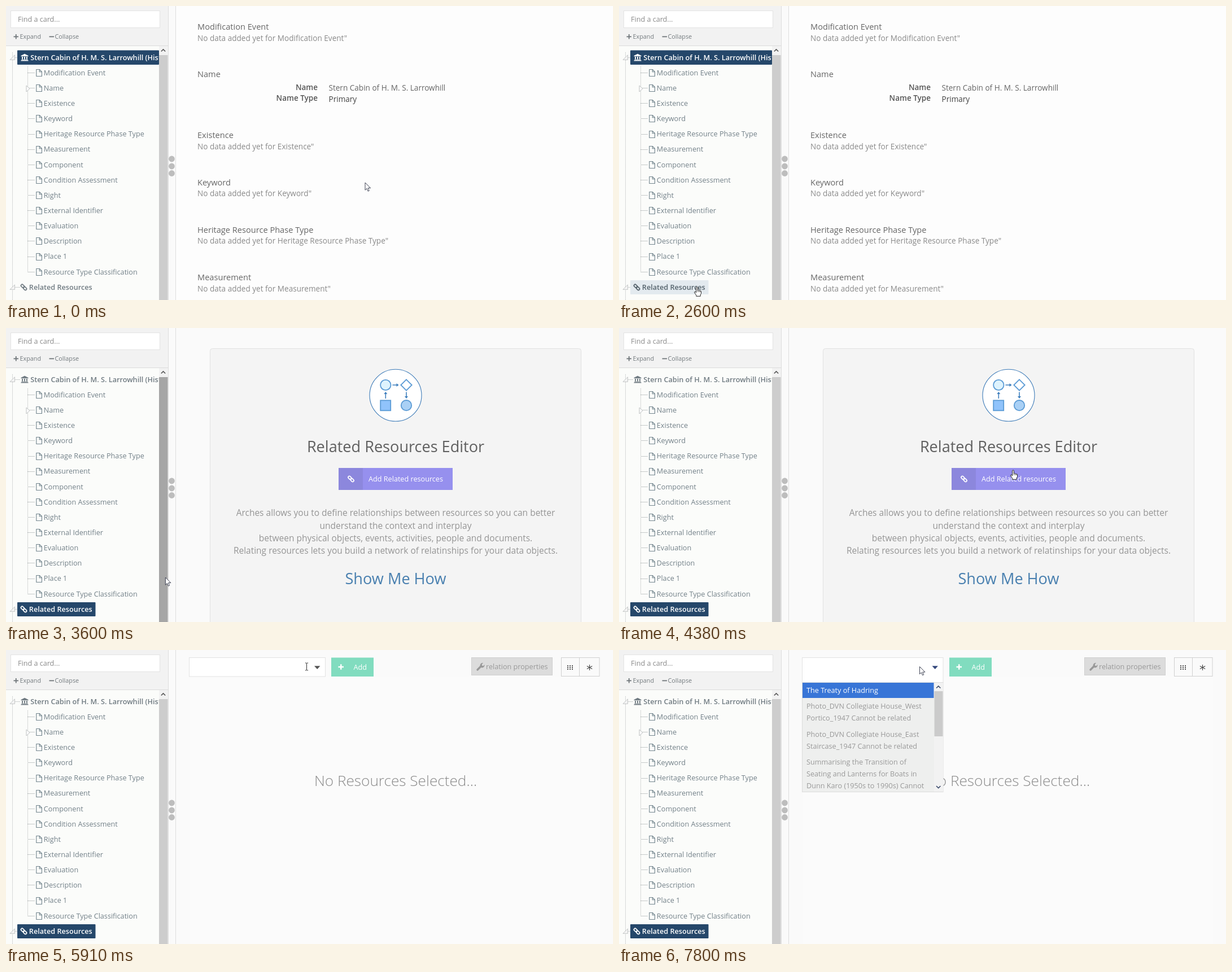
An HTML page for the animation above (8000 ms loop, 1075 by 521 pixels).

```html
<!DOCTYPE html>
<html lang="en">
<head>
<meta charset="utf-8">
<title>Resource editor</title>
<style>
html, body { margin: 0; width: 100%; height: 100%; overflow: hidden; background: #fdfdfd; }
svg { display: block; width: 100vw; height: 100vh; }
text { font-family: "Open Sans", "Noto Sans", sans-serif; white-space: pre; }
</style>
</head>
<body>
<svg id="stage" viewBox="0 0 1075 521" preserveAspectRatio="none"></svg>
<script>
const LOOP = 8000;
const SHIP = 'Stern Cabin of H. M. S. Larrowhill';
const CARDS = ['Modification Event', 'Name', 'Existence', 'Keyword', 'Heritage Resource Phase Type',
  'Measurement', 'Component', 'Condition Assessment', 'Right', 'External Identifier', 'Evaluation',
  'Description', 'Place 1', 'Resource Type Classification'];
const rowY = i => 91.3 + 27.14 * i;
const crisp = y => Math.floor(y) + 0.5;

// drawing helpers, all returning markup
const rect = (x, y, w, h, fill, more = '') => `<rect x="${x}" y="${y}" width="${w}" height="${h}" fill="${fill}" ${more}/>`;
const path = (d, fill, more = '') => `<path d="${d}" fill="${fill}" ${more}/>`;
const line = (d, color, w = 1, more = '') => path(d, 'none', `stroke="${color}" stroke-width="${w}" ${more}`);
const circle = (x, y, r, fill, more = '') => `<circle cx="${x}" cy="${y}" r="${r}" fill="${fill}" ${more}/>`;
const text = (x, y, size, fill, str, more = '') => `<text x="${x}" y="${Math.round(y)}" font-size="${size}" fill="${fill}" ${more}>${str}</text>`;
const group = (id, body, more = '') => `<g id="${id}" ${more}>${body}</g>`;
const mid = 'text-anchor="middle"', semi = 'font-weight="600"';

const chain = (x, y) => `<g transform="translate(${x} ${y}) rotate(45)" fill="none" stroke="currentColor" stroke-width="1.7">
  <rect x="-6.2" y="-2.1" width="6.6" height="4.2" rx="2.1"/><rect x="-.4" y="-2.1" width="6.6" height="4.2" rx="2.1"/></g>`;
const bank = (x, y) => path(`M${x} ${y - 3.2}l6.5 -3.3l6.5 3.3v1.2h-13zM${x + 1.6} ${y - 1.2}h2v4.4h-2zM${x + 5.5} ${y - 1.2}h2v4.4h-2zM${x + 9.4} ${y - 1.2}h2v4.4h-2zM${x + .8} ${y + 3.6}h11.4v1h-11.4zM${x} ${y + 5}h13v1.3h-13z`, 'currentColor');
const page = (x, y) => line(`M${x} ${y - 6}h5.6l4 4v8h-9.6zM${x + 5.4} ${y - 6}v4.2h4.2`, '#74868f', 1.15);
const corner = y => path(`M15.5 ${y - 4.5}v8.5h-8.5z`, '#f4f4f4', 'stroke="#c3c6c6"');

function sidebar() {
  let s = rect(0, 0, 287, 70, '#f2f2f2') + rect(0, 70, 287, 451, '#fbfcfa') + rect(0, 70, 287, 1, '#dcdcdc')
    + rect(8.5, 8.5, 264, 30, '#fff', 'stroke="#e3e3e3"')
    + text(21, 28.4, 12.6, '#8b8b8b', 'Find a card...')
    + line('M13.5 54.3h8.5M17.75 50v8.5M76.5 54.3h8.5', '#6e7478', 1.8)
    + text(24.5, 58.4, 10.8, '#737a7e', 'Expand') + text(86.5, 58.4, 10.8, '#737a7e', 'Collapse');
  s += line('M11.5 82v439M38.5 107v364', '#b4b8b8', 1, 'stroke-dasharray="1 1"');
  s += line(`M16 ${crisp(rowY(0))}h9M16 ${crisp(rowY(15))}h9`, '#cfd2d2') + corner(rowY(0)) + corner(rowY(15));
  s += rect(20, 78.5, 251, 25.5, '#25476a', 'rx="1" id="shipBox"')
    + group('ship', bank(26.5, rowY(0)) + text(43.3, rowY(0) + 4.3, 12.7, 'currentColor', SHIP + ' (Historic Resource)', semi), 'clip-path="url(#tree)"');
  CARDS.forEach((name, i) => {
    const y = rowY(i + 1);
    s += line(`M38 ${crisp(y)}h13`, '#c6caca') + rect(47, y - 13, 10, 26, '#e3eaef', `id="box${i}" display="none"`)
      + page(53.8, crisp(y)) + text(66.8, y + 4.3, 12.65, '#738189', name, `id="card${i}"`);
  });
  s += path('M36 141v11l6 -5.500z', '#fcfcfc', 'stroke="#bcc0c0"');
  s += rect(20, 486, 138.5, 25, '#25476a', 'rx="1" id="linkBox"')
    + group('link', chain(31.5, rowY(15)) + text(40.8, rowY(15) + 4.3, 12.65, 'currentColor', 'Related Resources', semi));
  s += rect(271, 71, 16, 450, '#f2f2f2') + rect(271, 87, 15.5, 434, '#cdcdcd', 'id="thumb"')
    + line('M274.800 80.500l3.700 -3.600l3.700 3.600', '#555', 1.6);
  s += rect(287, 0, 14, 521, '#fafafa') + line('M287.500 0v521M300.500 0v521', '#dedede');
  return s + [271, 284, 296.5].map(y => circle(293.5, y, 5.4, '#bdbdbd')).join('');
}

function report() {
  const heads = [[0, 42], [1, 126], [2, 234], [3, 317.6], [4, 401.6], [5, 486]];
  return rect(301, 0, 774, 521, '#fdfdfd') + heads.map(([i, y]) => text(339, y, 14.6, '#666', CARDS[i])
    + (i === 1 ? '' : text(339, y + 19.5, 13.57, '#8a8a8a', `No data added yet for ${CARDS[i]}"`))).join('')
    + text(552, 148.6, 13.5, '#555', 'Name', semi + ' text-anchor="end"')
    + text(552, 168.3, 13.5, '#555', 'Name Type', semi + ' text-anchor="end"')
    + text(571.5, 150, 13.57, '#666', SHIP) + text(571.5, 169.6, 13.57, '#444', 'Primary');
}

function editor() {
  const blue = '#5b9bd5', edge = `stroke="${blue}" stroke-width="1.8"`;
  const lines = ['Arches allows you to define relationships between resources so you can better',
    'understand the context and interplay', 'between physical objects, events, activities, people and documents.',
    'Relating resources lets you build a network of relatinships for your data objects.'];
  return rect(301, 0, 774, 521, '#fafafa') + rect(361.5, 36.5, 657, 500, '#f4f4f4', 'rx="4" stroke="#e1e1e1"')
    + circle(690, 119.3, 46, '#fff', 'stroke="#3d7bb8" stroke-width="1.1"')
    + circle(672.3, 101, 9.2, '#def3fd', edge) + path('M709 91.300l9.700 9.700l-9.700 9.700l-9.700 -9.700z', '#fff', edge)
    + rect(663.2, 128.3, 18, 18, '#90c3fb', edge) + circle(709, 137.2, 9.2, '#a9d0f5', edge)
    + line('M684.500 101h8M672.300 125v-8M709 113.500v8', '#3f7fbd', 1.6)
    + path('M691.500 98l4 3l-4 3zM669.300 117l3 -4l3 4zM706 121l3 4l3 -4z', '#3f7fbd')
    + text(690, 220, 27.1, '#606060', 'Related Resources Editor', mid)
    + rect(589, 248, 202, 39, '#9690ee') + rect(589, 248, 43, 39, '#8c87dd')
    + `<g color="#fff">${chain(611, 267.5)}</g>` + text(642, 272, 12.65, '#fff', 'Add Related resources')
    + lines.map((l, i) => text(690, 333.3 + 22.2 * i, 15.5, '#959595', l, mid)).join('')
    + text(690, 454, 27.1, '#487faf', 'Show Me How', mid);
}

function picker() {
  let dots = '';
  for (let i = 0; i < 9; i++) dots += rect(994 + 4 * (i % 3), 27 + 3 * Math.floor(i / 3), 2, 2, '#555');
  const add = rect(576, 13.5, 75, 33.5, '#81dcbf') + line('M588.500 30h9.500M593.250 25.300v9.500', '#fff', 2.4)
    + text(615.5, 34.8, 12.65, '#fff', 'Add');
  const items = [[104, 'Photo_DVN Collegiate House_West'], [125, 'Portico_1947 Cannot be related'],
    [153.6, 'Photo_DVN Collegiate House_East'], [174.6, 'Staircase_1947 Cannot be related'],
    [203, 'Summarising the Transition of'], [224.2, 'Seating and Lanterns for Boats in'],
    [245.4, 'Dunn Karo (1950s to 1990s) Cannot']];
  return rect(301, 0, 774, 521, '#fafafa') + rect(325, 47, 727, 474, '#fbfbfb')
    + text(690, 241, 26.2, '#8b8b8b', 'No Resources Selected...', mid + ' font-weight="300"')
    + group('add', add)
    + rect(824.5, 13.5, 143, 31, '#dcdcdc', 'stroke="#cfcfcf"')
    + line('M835 35l6.500 -6.500', '#999', 3.4, 'stroke-linecap="round"')
    + path('M840 29a4.300 4.300 0 0 1 5 -6l-2.300 2.500l.5 2.200l2.200 .5l2 -2.400a4.300 4.300 0 0 1 -5.800 5.200z', '#999')
    + text(850, 33.6, 12.65, '#999', 'relation properties')
    + rect(983.5, 13.5, 32, 33, '#fafafa', 'stroke="#d0d0d0"') + rect(1015.5, 13.5, 35.5, 33, '#fafafa', 'stroke="#d0d0d0"')
    + dots + line('M1033.500 26v10M1028.800 28.500l9.400 5M1038.200 28.500l-9.400 5', '#4a4a4a', 1.2)
    + group('shut', rect(324.5, 13.5, 241, 33.5, '#fff', 'stroke="#e2e2e2"') + path('M546 28.300h10.400l-5.200 5.700z', '#555'))
    + group('open', rect(324.5, 13.5, 249.5, 44, '#fff', 'stroke="#e2e2e2"') + path('M554.500 28.300h10.400l-5.200 5.700z', '#34487c')
      + rect(340, 23, 1, 15, '#333', 'id="caret"'))
    + group('wait', rect(324.5, 57, 249.5, 29.5, '#fff', 'stroke="#e2e2e2"') + text(332, 76, 12.65, '#888', 'Searching...'))
    + group('list', rect(324.5, 57.5, 249.5, 194, '#eeefee', 'stroke="#dcdcdc"') + rect(325, 58, 232.5, 27, '#3875d7')
      + text(332, 76, 12.65, '#fff', 'The Treaty of Hadring') + items.map(([y, l]) => text(332, y, 12.65, '#999', l)).join('')
      + rect(558, 58, 16, 193, '#f2f2f2') + rect(558.5, 73, 15, 80, '#cbcbcb')
      + line('M562 67.500l3.700 -3.600l3.700 3.600M562 241l3.700 3.600l3.700 -3.600', '#3a4a6b', 1.6));
}

const cursors = group('arrow', path('M0 0v13.200l3 -2.800l2 4.800l2.200 -.9l-2 -4.700h4.300z', '#fff', 'stroke="#2b2f42" stroke-width=".9"'))
  + group('hand', path('M-1.300 1.200Q0 -.7 1.300 1.200V6.300Q2.700 5.300 3.500 6.800Q5 6 5.700 7.400Q7.400 7 7.500 8.600V12L6.200 14.500V16.800H-1.200V15L-4.300 10.500Q-4.800 8.600 -3.200 8.700L-1.300 10.300z', '#fff', 'stroke="#222" stroke-width="1"')
    + line('M1.300 6.300v3M3.500 7v2.500M5.600 7.600v2', '#222', .7))
  + group('beam', line('M-2.600 -6.500h2l.6 .6l.6 -.6h2M-2.600 6.500h2l.6 -.6l.6 .6h2M0 -5.900v11.800', '#333', 1));

const stage = document.getElementById('stage');
stage.innerHTML = '<clipPath id="tree"><rect x="0" y="71" width="270.500" height="450"/></clipPath>'
  + group('report', report()) + group('editor', editor()) + group('picker', picker()) + sidebar() + cursors;

const el = id => document.getElementById(id);
const show = (id, on) => el(id).setAttribute('display', on ? 'inline' : 'none');
const ends = CARDS.map((_, i) => 72 + el('card' + i).getComputedTextLength());
ends.forEach((x, i) => el('box' + i).setAttribute('width', x - 47));

// pointer moves: first step, last step, number of steps, bezier x and y
const MOVES = [
  [500, 1270, 11, [636, 600, 280, 205.5], [313, 360, 230, 96.5]],
  [1360, 2130, 11, [205.5, 212, 225, 249], [96.5, 200, 400, 480]],
  [2210, 2600, 6, [249, 225, 170, 138], [480, 478, 498, 497.5]],
  [3300, 4080, 11, [138, 260, 540, 667], [497.5, 470, 300, 279]],
  [4130, 4380, 4, [667, 675, 697, 698], [279, 265, 245, 251.5]],
  [4460, 4510, 2, [698, 697, 692, 688], [251.5, 256, 262, 267]],
  [5280, 5910, 9, [688, 640, 535, 532.5], [267, 120, -30, 29.5]]
];
const bezier = ([a, b, c, d], u) => {
  const v = 1 - u;
  return v * v * v * a + 3 * v * v * u * b + 3 * v * u * u * c + u * u * u * d;
};
function pointer(t) {
  let pos = [636, 313];
  for (const [from, to, n, xs, ys] of MOVES) {
    if (t < from) break;
    const k = Math.min(n, 1 + Math.floor((t - from) / (to - from) * (n - 1) + 1e-6)) / n;
    const u = k * k * (3 - 2 * k);
    pos = [bezier(xs, u), bezier(ys, u)];
  }
  return pos;
}

function draw(t) {
  const [x, y] = pointer(t);
  const picked = t >= 2900, view = t < 2980 ? 'report' : t < 4740 ? 'editor' : 'picker';
  const opened = t >= 6180, listed = t >= 6560;
  const row = Math.floor((y - rowY(0) + 13.3) / 27.14);
  const onShip = row === 0 && x > 20 && x < 271;
  const onLink = row === 15 && x > 20 && x < 159;
  const onCard = row > 0 && row < 15 && x > 47 && x < ends[row - 1];
  const onButton = view === 'editor' && x > 589 && x < 791 && y > 248 && y < 287;
  const onField = view === 'picker' && !opened && x > 325 && x < 566 && y > 8 && y < 47;

  for (const v of ['report', 'editor', 'picker']) show(v, v === view);
  CARDS.forEach((_, i) => show('box' + i, onCard && row === i + 1));
  show('shipBox', !picked || onShip);
  el('ship').setAttribute('color', picked ? '#707b82' : '#fff');
  show('linkBox', picked || onLink);
  el('linkBox').setAttribute('fill', picked ? '#25476a' : '#e3eaef');
  el('link').setAttribute('color', picked ? '#fff' : onLink ? '#55636c' : '#707b82');
  el('thumb').setAttribute('fill', x > 271 && x < 287 && y > 87 ? '#a6a6a6' : '#cdcdcd');

  show('shut', !opened);
  show('open', opened);
  show('wait', opened && !listed);
  show('list', listed);
  show('caret', (t >= 6260 && t < 6790) || (t >= 7270 && t < 7800));
  el('add').setAttribute('transform', `translate(${opened ? 9 : 0} 0)`);

  const kind = onField ? 'beam' : onShip || onLink || onCard || onButton ? 'hand' : 'arrow';
  for (const c of ['arrow', 'hand', 'beam']) show(c, c === kind);
  el(kind).setAttribute('transform', `translate(${x.toFixed(1)} ${y.toFixed(1)})`);
}

const start = performance.now();
function tick() {
  draw((performance.now() - start) % LOOP);
  requestAnimationFrame(tick);
}
draw(0);
requestAnimationFrame(tick);
</script>
</body>
</html>
```
